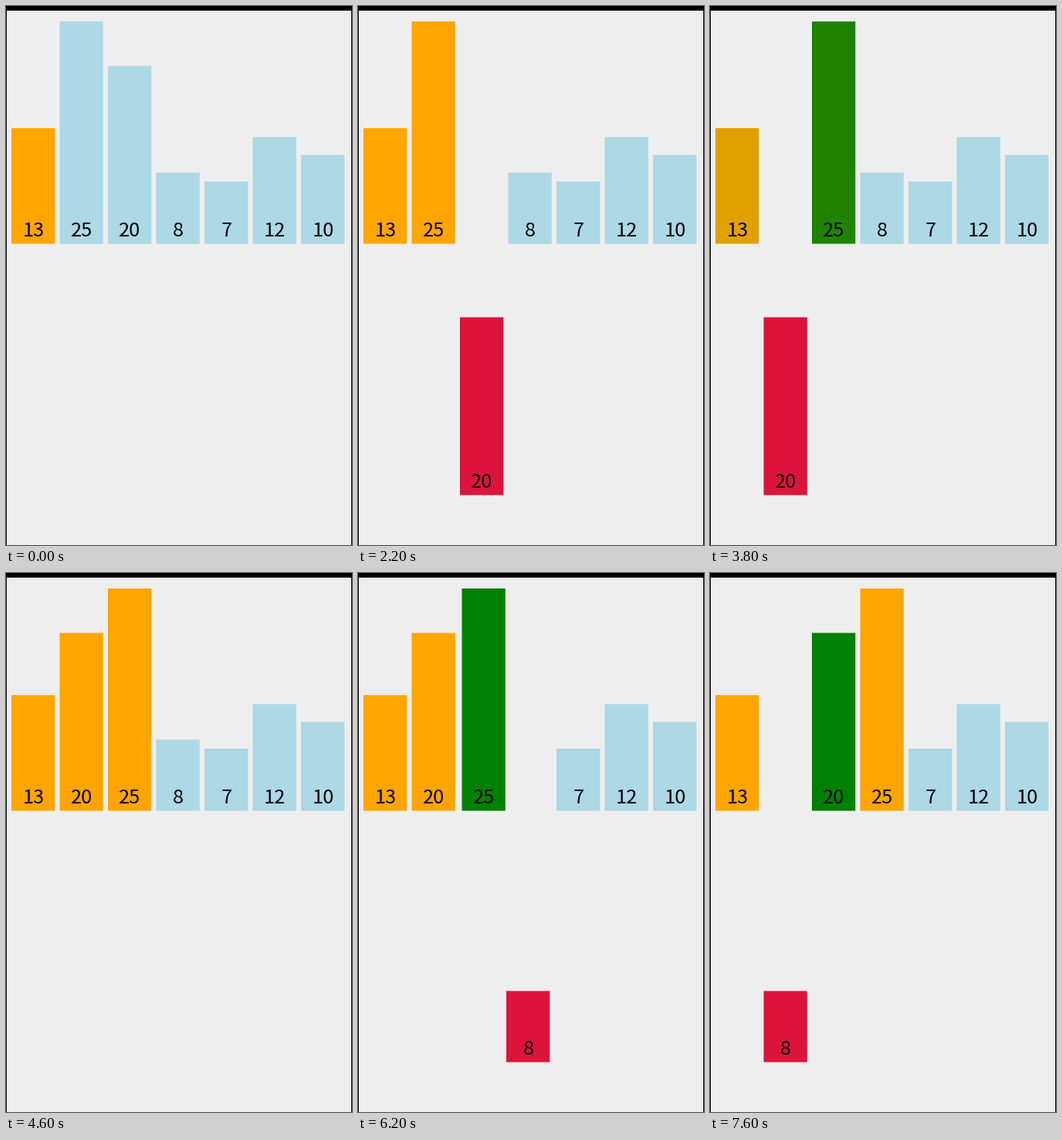
Animation of 448x697 px, one loop 8 s. Source, as a matplotlib script:

```python
import math

import matplotlib.pyplot as plt
import numpy as np
from matplotlib.animation import FuncAnimation
from matplotlib.colors import to_rgb
from matplotlib.patches import Rectangle

W, H, DPI = 448, 697, 64
FRAMES, TICK = 80, 100

VALUES = [13, 25, 20, 8, 7, 12, 10]
LEFT, PITCH, BAR_W = 7, 62.5, 56.25
BASE, UNIT, DROP = 307.5, 11.5, 325
TEXT_Y, TEXT_PX = 298, 25.4

IDLE, SORTED, ACTIVE, KEY = "lightblue", "orange", "green", "crimson"
EASE_MS = 250
DEADBAND = 0.075


def insertion_steps(values):
    """Yield one {value: (slot, lowered, colour)} state per step."""
    order = list(values)
    state = {v: (i, 0, IDLE) for i, v in enumerate(order)}
    state[order[0]] = (0, 0, SORTED)
    yield dict(state)
    for i in range(1, len(order)):
        key, j = order[i], i
        state[key] = (i, 1, KEY)
        yield dict(state)
        while j > 0:
            other = order[j - 1]
            if j < i:
                state[order[j + 1]] = (j + 1, 0, SORTED)
            state[other] = (j - 1, 0, ACTIVE)
            yield dict(state)
            if other < key:
                break
            order[j - 1], order[j] = key, other
            state[other] = (j, 0, ACTIVE)
            state[key] = (j - 1, 1, KEY)
            yield dict(state)
            j -= 1
        for v in order[:i + 1]:
            state[v] = (order.index(v), 0, SORTED)
        yield dict(state)


def step_start(k):
    # timers run slightly late, a little more with each step
    return 707 + 603.1 * (k - 1) + 0.311 * (k - 1) * (k - 6)


def cubic_in_out(t):
    t = min(max(t, 0), 1)
    return 4 * t ** 3 if t < 0.5 else 1 - 4 * (1 - t) ** 3


def progress(k, now, tint_only):
    start = step_start(k)
    if not tint_only:
        return cubic_in_out((now - start) / EASE_MS)
    # a lone colour change skips barely visible updates
    shown = 0
    for t in range(math.ceil(start / TICK) * TICK, now + 1, TICK):
        p = cubic_in_out((t - start) / EASE_MS)
        if p - shown > DEADBAND:
            shown = p
    return shown


def mix(a, b, p):
    return np.array(a) + (np.array(b) - np.array(a)) * p


STEPS = list(insertion_steps(VALUES))

fig = plt.figure(figsize=(W / DPI, H / DPI), dpi=DPI, facecolor="black")
ax = fig.add_axes([0, 0, 1, 1])
ax.set(xlim=(0, W), ylim=(H, 0))
ax.axis("off")
ax.add_patch(Rectangle((1, 6), W - 2, H - 6, fc="#eeeeee", lw=0))

bars, labels = {}, {}
for v in VALUES:
    bars[v] = ax.add_patch(Rectangle((0, 0), BAR_W, v * UNIT, lw=0, snap=False))
    labels[v] = ax.text(0, 0, str(v), ha="center", va="baseline", color="black",
                        family="Noto Sans CJK JP", size=TEXT_PX * 72 / DPI)


def draw(frame):
    now = frame * TICK
    k = -1
    while k + 2 < len(STEPS) and step_start(k + 1) <= now:
        k += 1
    before, after = STEPS[max(k, 0)], STEPS[k + 1]
    changed = [v for v in VALUES if before[v] != after[v]]
    tint_only = len(changed) == 1 and all(
        before[v][:2] == after[v][:2] for v in changed)
    p = progress(k, now, tint_only) if k >= 0 else 1

    for v in VALUES:
        (slot0, low0, col0), (slot1, low1, col1) = before[v], after[v]
        slot, low = mix((slot0, low0), (slot1, low1), p)
        x, dy = LEFT + slot * PITCH, low * DROP
        bars[v].set_xy((x, BASE - v * UNIT + dy))
        bars[v].set_facecolor(mix(to_rgb(col0), to_rgb(col1), p))
        labels[v].set_position((x + BAR_W / 2 + 0.3, TEXT_Y + dy))
    return [*bars.values(), *labels.values()]


anim = FuncAnimation(fig, draw, frames=FRAMES, interval=TICK,
                     repeat=True, repeat_delay=0, blit=False)
plt.show()
```
